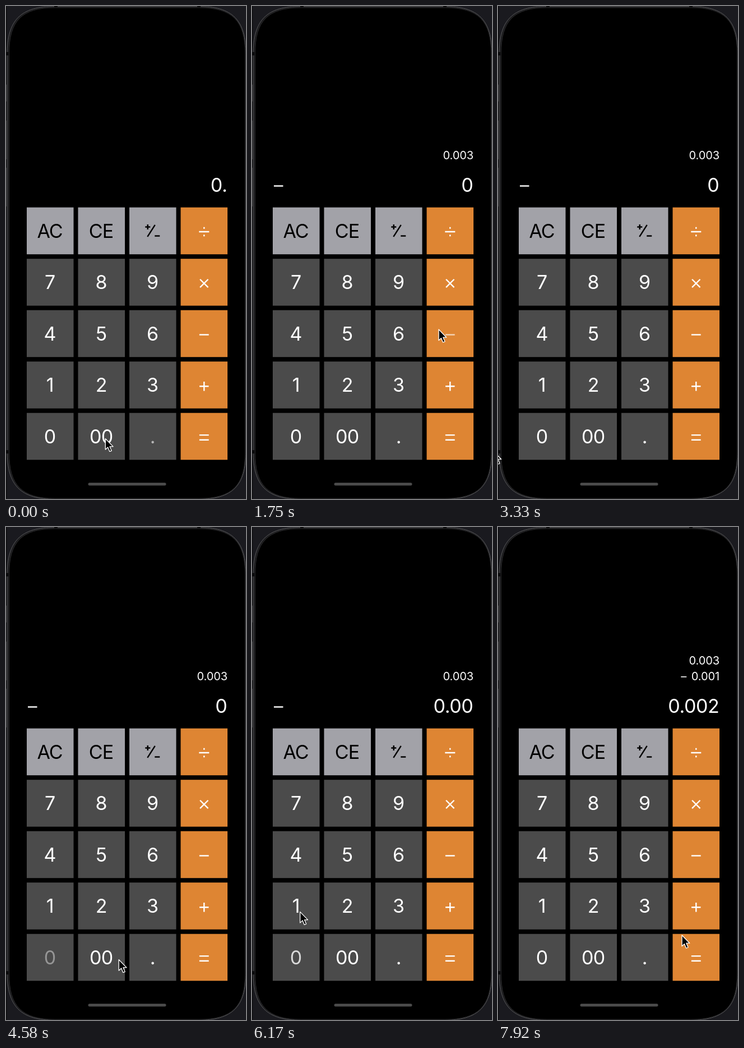
Recreate the animation shown at these times as an HTML page. Size 428 by 878 pixels, loop 8010 ms.

```html
<!DOCTYPE html>
<html lang="en">
<head>
<meta charset="utf-8">
<title>Calculator</title>
<style>
  html, body { margin: 0; width: 100%; height: 100%; overflow: hidden; background: #1a1a1f; }
  svg { display: block; width: 428px; height: 878px; }
  text { font: 400 34px Inter, Roboto, sans-serif; letter-spacing: -.4px; fill: #fff; }
  .small { font-size: 20px; letter-spacing: -.1px; }
  .end { text-anchor: end; }
  .mid { text-anchor: middle; letter-spacing: -.8px; }
  .line { fill: none; stroke: #fff; stroke-width: 2.4; }
  #newer { word-spacing: 3px; }
</style>
</head>
<body>
<svg viewBox="0 0 428 878">
  <path d="M0 0H1.5V878H0Z" fill="#0c0c0e"/>
  <path d="M0 140h1.5v30H0zM0 204h1.5v69H0zM0 288h1.5v69H0z" fill="#303032"/>
  <path id="body" fill="#1c1c1e" stroke="#58585a"/>
  <path d="M86 0h6v3h-6zM341 0h6v3h-6zM1 82h5v6h-5zM1 791h5v6h-5z" fill="#0a0a0b"/>
  <path id="screen" fill="#000" stroke="#29292b"/>
  <rect x="146.5" y="849" width="139" height="5" rx="2.5" fill="#4a4a4a"/>
  <g id="keys"></g>
  <text id="older" class="small end" x="395" y="273"></text>
  <text id="newer" class="small end" x="395" y="273"></text>
  <path id="sign" class="line" d="M39 320.5H55.5"/>
  <text id="display" class="end" x="394.4" y="331"></text>
  <path id="cursor" d="M0 0V19.5L4.4 15.4L7.6 23L11 21.6L7.8 14.2H13.8Z"
        fill="#000" stroke="#fff" stroke-width="1.3" stroke-linejoin="round"/>
</svg>
<script>
const LOOP = 8010, FPS = 12, FRAMES = 96;
const PITCH = 91.5, SIZE = 83.5, LEFT = 37, TOP = 358.7, ROW = 28;
const FADE = 450, SETTLE = 250;
const $ = id => document.getElementById(id);

// Rounded outline whose corners ease into the straight sides
function outline(x, y, w, h, r) {
  const k = r * 0.72, e = r - k;
  const corners = [`${-e} 0 ${-r} ${k} ${-r} ${r}`, `0 ${e} ${k} ${r} ${r} ${r}`,
    `${e} 0 ${r} ${-k} ${r} ${-r}`, `0 ${-e} ${-k} ${-r} ${-r} ${-r}`];
  // Corners run anticlockwise from the top left
  const c = [`c${-k} 0 ${-r} ${e} ${-r} ${r}`, `c0 ${k} ${e} ${r} ${r} ${r}`,
    `c${k} 0 ${r} ${-e} ${r} ${-r}`, `c0 ${-k} ${-e} ${-r} ${-r} ${-r}`];
  return `M${x + r} ${y}${c[0]}v${h - 2 * r}${c[1]}h${w - 2 * r}${c[2]}v${2 * r - h}${c[3]}Z`;
}
$('body').setAttribute('d', outline(2, 0.5, 426, 878, 86));
$('screen').setAttribute('d', outline(5.5, 3, 421, 874, 82));

// Symbol outlines, relative to the key centre
const symbols = {
  '±': 'M-13.5-7h9M-9-11.5v9M-9.5 10.5L4-10.5M3.5 9h9',
  '÷': 'M-9 1.5H9M0-6.8v3M0 6.8v3',
  '×': 'M-7.2-5.2L7.2 9.2M7.2-5.2L-7.2 9.2',
  '−': 'M-8.4 2H8.4',
  '+': 'M-8.2 2.3H8.2M0-5.9V10.5',
  '=': 'M-8.4-2.3H8.4M-8.4 6.3H8.4'
};

function add(parent, tag, attrs, text) {
  const node = document.createElementNS('http://www.w3.org/2000/svg', tag);
  for (const name in attrs) node.setAttribute(name, attrs[name]);
  if (text) node.textContent = text;
  parent.append(node);
  return node;
}

const keys = {};
['AC CE ± ÷', '7 8 9 ×', '4 5 6 −', '1 2 3 +', '0 00 . ='].forEach((row, r) =>
  row.split(' ').forEach((name, c) => {
    const x = LEFT + c * PITCH, y = TOP + r * PITCH;
    const cx = x + SIZE / 2, cy = y + SIZE / 2;
    const fill = c === 3 ? '#de8533' : r === 0 ? '#a2a2a8' : '#4b4b4b';
    const ink = r === 0 && c < 3 ? '#000' : '#fff';
    add($('keys'), 'rect', { x, y, width: SIZE, height: SIZE, fill });
    const label = symbols[name]
      ? add($('keys'), 'path', { class: 'line', d: symbols[name], transform: `translate(${cx} ${cy})`, style: `stroke:${ink}` })
      : add($('keys'), 'text', { class: 'mid', x: cx - 0.6, y: cy + 12.4, style: `fill:${ink}` }, name);
    keys[name] = { cx, cy, label };
  }));

const tap = (at, key) => ({ at, key, x: keys[key].cx + 7, y: keys[key].cy + 4 });
const rest = (at, x, y) => ({ at, x, y });

// Everything shown follows from this session of taps and pauses
const session = [
  tap(-225, '.'), tap(110, '00'), tap(840, '3'), tap(1500, '−'),
  rest(1800, 333, 576), rest(2560, 104, 780), rest(3400, -8, 793),
  tap(4460, '0'), tap(4760, '.'), tap(5310, '0'), tap(5830, '0'), tap(6330, '1'),
  tap(6920, '='), rest(7990, 328, 727)
];
const taps = session.filter(s => s.key);
const timeOf = key => taps.find(s => s.key === key).at;
const minusAt = timeOf('−'), equalsAt = timeOf('=');

const clamp = v => Math.max(0, Math.min(1, v));
function progress(t, start, span) {
  const v = clamp((t - start) / span);
  return v * v * (3 - 2 * v);
}

// The pointer leaves just after one stop and arrives shortly before the next
function pointer(t) {
  const i = Math.max(1, session.findIndex(s => s.at > t));
  const a = session[i - 1], b = session[i];
  const k = progress(t, a.at + 20, b.at - a.at - 130);
  return [a.x + (b.x - a.x) * k, a.y + (b.y - a.y) * k];
}

function calculate(t) {
  let entry = '0', first = '', second = '';
  for (const { at, key } of taps) {
    if (at > t) break;
    if (key === '−') { first = entry; entry = '0'; }
    else if (key === '=') { second = entry; entry = (first - second).toFixed(3); }
    else entry = entry === '0' && key !== '.' ? key : entry + key;
  }
  return { entry, first, second };
}

function draw(t) {
  for (const name in keys) keys[name].label.style.opacity = 1;
  for (const { at, key } of taps)
    if (t >= at) keys[key].label.style.opacity = 0.2 + 0.8 * clamp((t - at) / FADE);

  const { entry, first, second } = calculate(t);
  const shift = progress(t, equalsAt, SETTLE);
  $('display').textContent = entry;
  $('sign').style.opacity = first && !second ? 1 : 0;
  $('older').textContent = first;
  $('older').style.opacity = progress(t, minusAt, SETTLE);
  $('older').setAttribute('y', 273 - ROW * shift);
  $('newer').textContent = second && '– ' + second;
  $('newer').style.opacity = shift;
  $('cursor').setAttribute('transform', `translate(${pointer(t)})`);
}

// The picture advances in steps that begin on whole hundredths of a second
function stepTime(ms) {
  const tick = Math.floor(ms / 10) * 10 + 9.99;
  const n = Math.min(FRAMES - 1, Math.floor(tick * FPS / 1000));
  return Math.floor(n * 100 / FPS) * 10;
}

const begin = performance.now();
function loop() {
  draw(stepTime((performance.now() - begin) % LOOP));
  requestAnimationFrame(loop);
}
loop();
</script>
</body>
</html>
```
